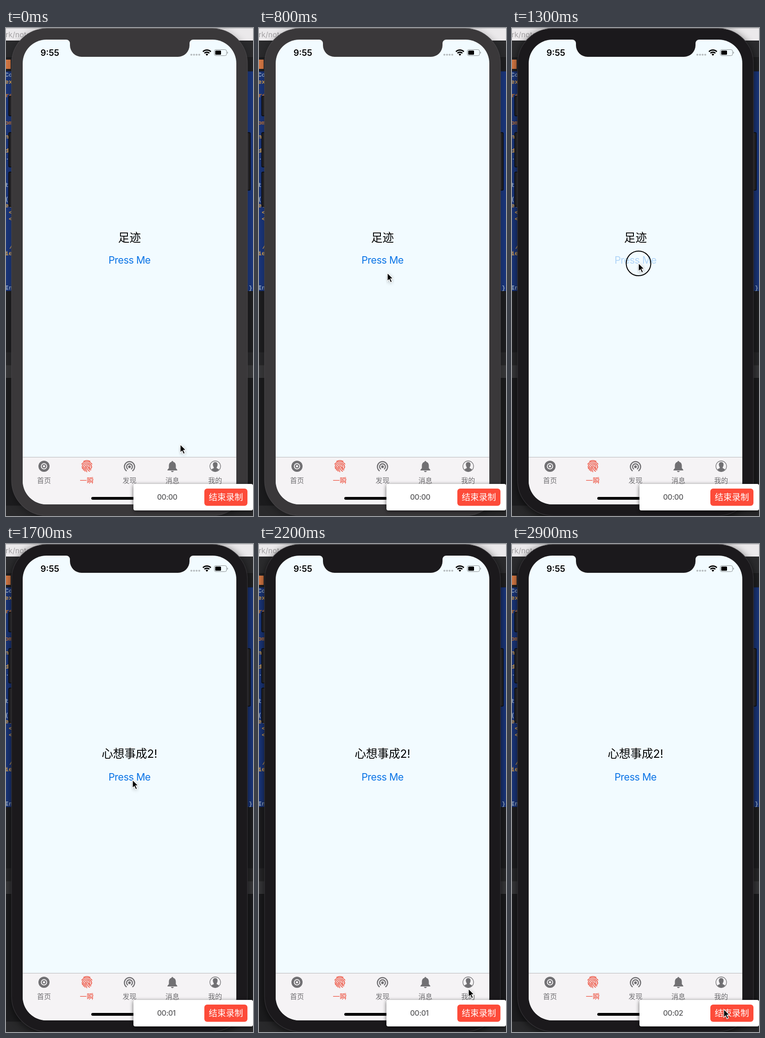
An HTML page for the animation above (3000 ms loop, 533 px wide and 1050 px high).

```html
<!DOCTYPE html>
<html lang="zh-CN">
<head>
<meta charset="utf-8">
<title>Press Me</title>
<style>
  html, body { margin: 0; width: 100%; height: 100%; overflow: hidden; background: #1e1e20; }
  svg { display: block; width: 533px; height: 1050px; }
  text { font-family: Inter, "Noto Sans CJK SC", "Noto Sans CJK", sans-serif; }
  #code text { font: 700 13px "Liberation Mono", monospace; }
  .mid { text-anchor: middle; }
  .line { fill: none; stroke: currentColor; stroke-linecap: round; }
</style>
</head>
<body>
<svg viewBox="0 0 533 1050">
  <defs>
    <filter id="blur" x="-20%" y="-20%" width="140%" height="140%"><feGaussianBlur stdDeviation="9"/></filter>
    <filter id="soft" x="-20%" y="-40%" width="140%" height="180%"><feGaussianBlur stdDeviation="4"/></filter>
    <clipPath id="screen"><rect x="36" y="25" width="461" height="1000" rx="51"/></clipPath>
  </defs>

  <g id="bands"></g>
  <rect y="68" width="10" height="20" fill="#d97a45"/>
  <text x="-1" y="20" font-size="16" fill="#a3a1a3">rk/noted</text>
  <g id="code"></g>

  <rect id="shade" x="12" y="5" width="509" height="1048" rx="76" filter="url(#blur)"/>
  <g id="keys" fill="#222123" stroke="#08080a" stroke-width="1.5"></g>
  <rect id="body" x="12" y="1" width="509" height="1048" rx="76" stroke-width="1.2"/>

  <g clip-path="url(#screen)">
    <rect x="36" y="25" width="461" height="1000" fill="#f2fbff"/>
    <rect x="36" y="923" width="461" height="102" fill="#f5f3f5"/>
    <path d="M36 923.5H497" stroke="#b9b8bb"/>
    <rect x="184" y="1009" width="165" height="6" rx="3"/>
  </g>
  <path id="notch" d="M130 24V25A8 8 0 0 1 138 33V37A25 25 0 0 0 163 62H371A25 25 0 0 0 396 37V33A8 8 0 0 1 404 25V24Z"/>

  <text x="74.500" y="60" font-size="18.500" font-weight="600">9:55</text>
  <g id="dots" fill="#b6bbbe"></g>
  <g transform="translate(433.500 59.500)" fill="none" stroke="#000" stroke-width="2.800">
    <path d="M-8.500 -8.500A12 12 0 0 1 8.500 -8.500M-5.300 -5.300A7.500 7.500 0 0 1 5.300 -5.300"/>
    <path d="M-2.800 -2.800A4 4 0 0 1 2.800 -2.800L0 .3Z" fill="#000" stroke="none"/>
  </g>
  <rect x="449.500" y="46.500" width="26.500" height="13" rx="3.500" fill="none" stroke="#8a8f92"/>
  <rect x="451.500" y="48.500" width="12.500" height="9" rx="1.500"/>
  <path d="M477.500 50.500Q480.500 53 477.500 55.500Z" fill="#8a8f92"/>

  <text id="title" class="mid" x="266.500" y="460" font-size="24.500"></text>
  <text id="press" class="mid" x="266.500" font-size="21.500" letter-spacing="-.5" fill="#0a74e6">Press Me</text>

  <g id="labels" font-size="15"></g>
  <g color="#717073" fill="#717073">
    <g transform="translate(82 943)">
      <circle r="12"/>
      <circle r="5.800" fill="none" stroke="#f5f3f5" stroke-width="1.900"/>
      <circle r="2.400" fill="#f5f3f5"/>
    </g>
    <g transform="translate(174.500 943)" color="#ed4f3d">
      <path class="line" stroke-width="1.600" d="M-7 -10.500Q0 -14.500 7 -10.500M-11 -4.500C-6.500 -11.500 6.500 -11.500 11 -4.500M-9.500 5C-11.500 -2 -8 -6.700 0 -6.700C7 -6.700 10.500 -2 10.300 2C10 5.500 5.500 5.500 5 2M-7 8.500C-8.500 2 -7.500 -3.700 0 -3.700C4 -3.700 6.500 -1.500 6.800 1M-3.800 10.800C-6 4 -4.500 -.8 0 -.8C2.500 -.8 3.500 1 3.700 3C4 6.500 6.500 8 9 7.500M0 12C-2.500 7 -2.500 4 -1.500 2M.3 2C.5 7 2.500 9.500 6 10.800"/>
    </g>
    <g transform="translate(266.500 944)">
      <path class="line" stroke-width="2.400" d="M-7 8.500A11 11 0 1 1 7 8.500M-4.200 4.700A6.300 6.300 0 1 1 4.200 4.700"/>
      <circle r="2.900"/>
    </g>
    <g transform="translate(359 943)">
      <path d="M-1.800 -9.500A1.800 2 0 0 1 1.800 -9.500C6 -8.500 7.500 -5 7.500 -1V4L10.500 7.500V9H-10.500V7.500L-7.500 4V-1C-7.500 -5 -6 -8.500 -1.800 -9.500ZM-3 10H3Q2.500 12.500 0 12.500Q-2.500 12.500 -3 10Z"/>
    </g>
    <g transform="translate(451.500 943)">
      <circle class="line" r="11.500" stroke-width="1.300"/>
      <path d="M0 -9C4 -9 5.500 -6 5 -2.500C4.700 0 3.500 1 3 3C3 5 7.500 5 8.200 7.500Q4 11.500 0 11.500Q-4 11.500 -8.200 7.500C-7.500 5 -3 5 -3 3C-3.500 1 -4.700 0 -5 -2.500C-5.500 -6 -4 -9 0 -9Z"/>
    </g>
  </g>

  <rect x="275" y="983" width="258" height="57" rx="4" opacity=".6" filter="url(#soft)"/>
  <rect x="275" y="981" width="258" height="57" rx="4" fill="#fff"/>
  <text id="timer" x="326" y="1015" font-size="16" font-weight="500" letter-spacing="-.5" fill="#5c5c5e"></text>
  <rect x="428" y="991" width="93" height="37" rx="6" fill="#fd4b39"/>
  <text class="mid" x="474.500" y="1016" font-size="18.500" font-weight="500" fill="#fff">结束录制</text>

  <circle id="ring" cx="273" cy="506.500" r="26.500" fill="none" stroke="#000" stroke-width="2"/>
  <g id="cursor">
    <path d="M0 0V17.500L4 14L7 20.500L10 19L7 12.500H12.500Z" transform="translate(0 2)" opacity=".35" filter="url(#soft)"/>
    <path d="M0 0V17.500L4 14L7 20.500L10 19L7 12.500H12.500Z" stroke="#fff" stroke-width="1.300"/>
  </g>
</svg>
<script>
const $ = id => document.getElementById(id);
const fill = (id, items, draw) => { $(id).innerHTML = items.map(draw).join(''); };

// top, bottom, colour of each editor strip
fill('bands', [
  [0, 27, '#ebe9eb'], [27, 63, '#2b2b2d'], [63, 93, '#202022'], [93, 566, '#1b377d'],
  [566, 697, '#1e1e20'], [697, 725, '#28282a'], [725, 753, '#38383a'],
  [753, 1027, '#1c1c1e'], [1027, 1050, '#29292b']
], ([a, b, c]) => `<rect y="${a}" width="533" height="${b - a}" fill="${c}"/><path d="M0 ${a + .5}H533" stroke="#0003"/>`);

const pale = '#93a9c8', gold = '#e0a850', rust = '#c97735';
fill('code', [
  [-2, 105, 'Co', pale], [-2, 120, 'ex', gold], [-1, 149, 're', rust], [-2, 208, 'om', rust],
  [-2, 238, 'n', gold], [-2, 268, 'd', gold], [-1, 283, '.', pale], [-2, 342, 't', pale],
  [-2, 372, '(', pale], [-2, 386, 'e.', gold], [6, 401, '&lt;', gold], [6, 415, '&lt;', gold],
  [7, 475, '/', gold], [-2, 489, 'ie', gold], [-2, 563, 'In', pale], [516, 563, '.}', pale]
], ([x, y, s, c]) => `<text x="${x}" y="${y}" fill="${c}">${s}</text>`);

fill('keys', [[6, 147, 42], [6, 225, 74], [6, 310, 74], [517, 225, 124]],
  ([x, y, h]) => `<rect x="${x}" y="${y}" width="10" height="${h}" rx="2"/>`);
fill('dots', [400, 405.7, 411.3, 417], x => `<circle cx="${x}" cy="57.500" r="2.100"/>`);
fill('labels', ['首页', '一瞬', '发现', '消息', '我的'], (s, i) =>
  `<text class="mid" x="${82 + i * 92.3}" y="979" fill="${i === 1 ? '#ed4f3d' : '#717073'}">${s}</text>`);

// time, x, y of the pointer tip
const path = [
  [0, 376, 896], [800, 277, 527], [1200, 273, 506], [1400, 273, 506], [1600, 273, 507.5],
  [1700, 273, 507.5], [2200, 452, 957], [2600, 457, 1001], [3000, 457, 1001]
];

function pointer(t) {
  const i = path.findIndex(p => p[0] > t);
  const [t0, x0, y0] = path[i - 1], [t1, x1, y1] = path[i];
  const u = (t - t0) / (t1 - t0), e = u * u * (3 - 2 * u);
  return [x0 + (x1 - x0) * e, y0 + (y1 - y0) * e];
}

function draw(now) {
  const t = Math.floor(now % 3000 / 100) * 100;
  const focused = t >= 1300, pressed = focused && t < 1500, done = t >= 1500;
  const frame = focused ? '#1b191c' : '#3a383a';
  $('body').setAttribute('fill', frame);
  $('body').setAttribute('stroke', focused ? '#343236' : '#464447');
  $('notch').setAttribute('fill', frame);
  $('shade').setAttribute('opacity', focused ? .7 : .35);
  $('title').textContent = done ? '心想事成2!' : '足迹';
  $('press').setAttribute('y', done ? 509 : 507);
  $('press').setAttribute('opacity', pressed ? .27 : 1);
  $('ring').setAttribute('visibility', pressed ? 'visible' : 'hidden');
  $('timer').textContent = '00:0' + (t < 1500 ? 0 : t < 2500 ? 1 : 2);
  $('cursor').setAttribute('transform', `translate(${pointer(t)})`);
}

const start = performance.now();
function loop() {
  draw(performance.now() - start);
  requestAnimationFrame(loop);
}
loop();
</script>
</body>
</html>
```
